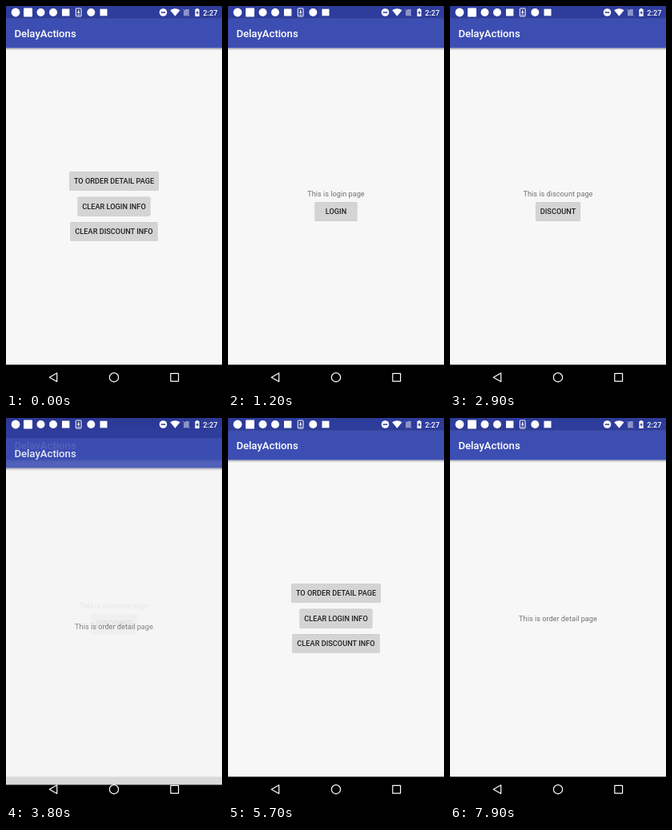
An HTML page for the animation above (8 s loop, 270 by 480 pixels).

```html
<!DOCTYPE html>
<html lang="en">
<head>
<meta charset="utf-8">
<title>DelayActions</title>
<style>
  html, body { margin: 0; width: 100%; height: 100%; overflow: hidden; background: #000; }
  svg { display: block; width: 100%; height: 100%; }
  text { font-family: Roboto, sans-serif; font-size: 9.2px; }
  .title { font-size: 13.14px; font-weight: 500; fill: #fff; }
  .label { fill: #737373; text-anchor: middle; }
  .button text { font-weight: 500; fill: #202020; text-anchor: middle; }
  .nav { fill: none; stroke: #fff; stroke-width: 1.2; stroke-linejoin: round; }
</style>
</head>
<body>
<svg viewBox="0 0 270 480">
  <defs>
    <linearGradient id="shade" x2="0" y2="1">
      <stop offset="0" stop-color="#000" stop-opacity=".3"/>
      <stop offset="1" stop-color="#000" stop-opacity="0"/>
    </linearGradient>
  </defs>
  <rect width="270" height="480"/>
  <g id="windows"></g>

  <g id="status" fill="#fff">
    <circle cx="12" cy="8" r="5.4"/>
    <rect x="22" y="2.5" width="11" height="11" rx=".8"/>
    <circle cx="43.5" cy="8" r="5"/>
    <circle cx="59" cy="8" r="5"/>
    <rect x="70" y="3.5" width="9.4" height="9" rx=".5"/>
    <rect x="87.3" y="3" width="6.8" height="10" rx=".8" fill="none" stroke="#fff"/>
    <path d="M90.1 5h1.2v2.6h1.5l-2.1 2.5-2.1-2.5h1.5zM88.6 10.8h4.2v.8h-4.2z"/>
    <circle cx="106.3" cy="8" r="5"/>
    <rect x="117.5" y="3.7" width="9" height="8.6"/>
    <circle cx="196.5" cy="8" r="4.8"/>
    <rect x="193.7" y="7.3" width="5.6" height="1.5" fill="#2e3c9c"/>
    <path d="M205.2 5.2Q211.4 1.2 217.6 5.2L211.4 12.8z"/>
    <g opacity=".45">
      <path d="M224.5 4h4.3v8.2h-6.8v-5.7z"/>
      <path d="M221 3.8l8.8 9" stroke="#fff"/>
    </g>
    <path d="M237.8 3h2.4v1h1.4v9h-5.2v-9h1.4z"/>
    <path d="M239.4 5.3l-2 3.7h1.4v2.6l2-3.8h-1.4z" fill="#2e3c9c"/>
    <text x="246.3" y="11.5" font-weight="500">2:27</text>
  </g>

  <rect id="ripple" x="28" y="448.4" width="62" height="31.6" rx="15.8" fill="#2d2d2d"/>
  <g class="nav">
    <path d="M54.3 464.2L63.7 458.8V469.6z"/>
    <circle cx="135" cy="464.2" r="5.6"/>
    <rect x="205.8" y="459.3" width="9.8" height="9.8"/>
  </g>
</svg>

<script>
const LOOP = 8000, STEP = 100, SLIDE = 38.4;

const label = (y, text) => `<text class="label" x="135" y="${y}">${text}</text>`;

const button = (id, cy, width, text) => `
  <g class="button">
    <rect id="${id}" x="${135 - width / 2}" y="${cy - 11.8}" width="${width}" height="23.6" rx="1.3"/>
    <text x="135" y="${cy + 3.3}">${text}</text>
  </g>`;

const page = (id, content) => `
  <g id="${id}">
    <rect y="448.4" width="270" height="31.6"/>
    <rect y="15.6" width="270" height="432.8" fill="#f7f7f7"/>
    <rect y="52.5" width="270" height="3.2" fill="url(#shade)"/>
    <rect y="15.6" width="270" height="36.9" fill="#3d4eb3"/>
    <rect width="270" height="15.6" fill="#2e3c9c"/>
    <text class="title" x="10.4" y="39.2">DelayActions</text>
    ${content}
  </g>`;

const $ = id => document.getElementById(id);

// Listed from the bottom of the activity stack to the top
$('windows').innerHTML =
  page('main',
    button('toOrder', 219.1, 111, 'TO ORDER DETAIL PAGE') +
    button('clearLogin', 250.6, 90.6, 'CLEAR LOGIN INFO') +
    button('clearDiscount', 282.1, 108.8, 'CLEAR DISCOUNT INFO')) +
  page('login', label(238.3, 'This is login page') + button('doLogin', 257, 52.6, 'LOGIN')) +
  page('discount', label(238.3, 'This is discount page') + button('doDiscount', 257, 55.4, 'DISCOUNT')) +
  page('order', label(253.9, 'This is order detail page'));

const pages = ['main', 'login', 'discount', 'order'];
const buttons = ['toOrder', 'clearLogin', 'clearDiscount', 'doLogin', 'doDiscount'];

const moves = [
  { at: -1000, from: 'main', to: 'main' },
  { at: 800, from: 'main', to: 'login' },
  { at: 2434, from: 'login', to: 'discount' },
  { at: 3718, from: 'discount', to: 'order' },
  { at: 5300, from: 'order', to: 'main', back: true },
  { at: 7524, from: 'main', to: 'order' }
];

const presses = [
  { id: 'toOrder', at: 500, end: 1200 },
  { id: 'doLogin', at: 2300, end: 2900 },
  { id: 'doDiscount', at: 3600, end: 4100 },
  { id: 'toOrder', at: 7400, end: 8000 }
];

const ramp = (t, start, length) => Math.min(1, Math.max(0, (t - start) / length));

function place(id, y, alpha) {
  const el = $(id);
  el.style.display = '';
  el.setAttribute('transform', `translate(0 ${y.toFixed(2)})`);
  el.setAttribute('opacity', alpha.toFixed(3));
}

function drawPages(t) {
  const { at, from, to, back } = moves.filter(m => m.at <= t).pop();
  const dt = t - at;
  pages.forEach(id => { $(id).style.display = 'none'; });
  if (dt < (back ? 250 : 350)) {
    if (back) {
      place(to, 0, 0.7 + 0.3 * (1 - (1 - ramp(dt, 0, 250)) ** 2));
      place(from, SLIDE * ramp(dt, 0, 250) ** 4, 1 - ramp(dt, 100, 150));
    } else {
      place(from, 0, 1 - 0.3 * ramp(dt, 0, 217) ** 2);
      place(to, SLIDE * (1 - ramp(dt, 0, 350)) ** 5, 1 - (1 - ramp(dt, 0, 200)) ** 4);
    }
  } else {
    place(to, 0, 1);
  }
}

function drawButtons(t) {
  for (const id of buttons) {
    const press = presses.find(p => p.id === id && t >= p.at && t < p.end);
    const grey = 212 - (press ? 14 * ramp(t, press.at, 200) : 0);
    $(id).setAttribute('fill', `rgb(${grey},${grey},${grey})`);
    $(id).style.filter = press
      ? 'drop-shadow(0 1.6px 1.4px rgba(0,0,0,.4))'
      : 'drop-shadow(0 .7px .7px rgba(0,0,0,.32))';
  }
}

function draw(t) {
  drawPages(t);
  drawButtons(t);
  $('ripple').setAttribute('opacity', t < 5200 ? 0 : 1 - ramp(t, 5300, 400));
}

const start = performance.now();
let shown = -1;

function tick() {
  const t = Math.floor(((performance.now() - start) % LOOP) / STEP) * STEP;
  if (t !== shown) draw(shown = t);
  requestAnimationFrame(tick);
}
tick();
</script>
</body>
</html>
```
